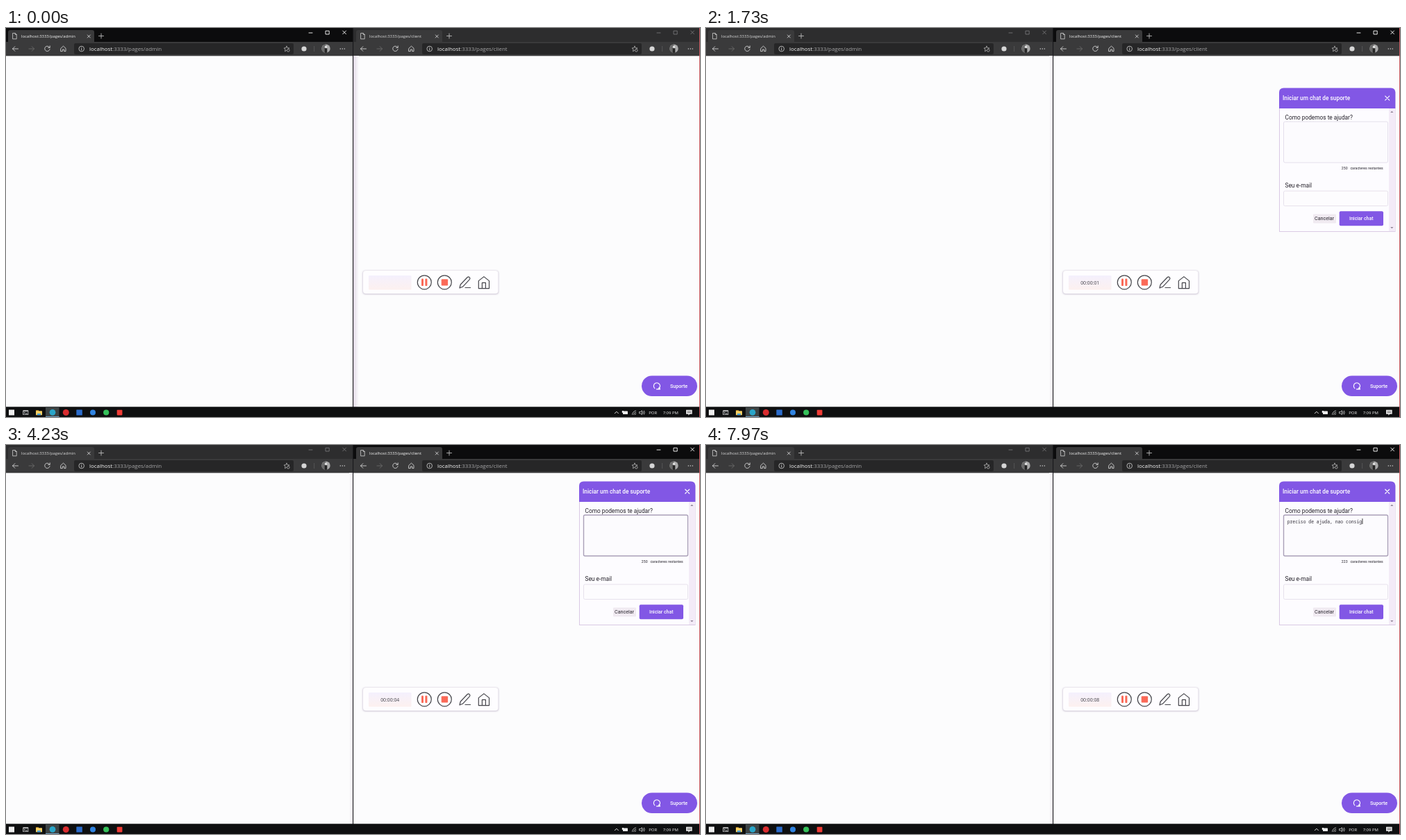
Animation, 999 px wide and 561 px high, one loop 8000 ms. Source, as an HTML page:

```html
<!DOCTYPE html>
<html lang="pt">
<head>
<meta charset="utf-8">
<title>Chat de suporte</title>
<style>
  html, body { margin: 0; width: 100%; height: 100%; overflow: hidden; background: #fcfcfd; }
  svg { display: block; width: 999px; height: 561px; }
  .ui { font-family: "Open Sans", "Noto Sans", sans-serif; }
  .rb { font-family: Roboto, Arial, sans-serif; }
  .mono { font-family: "Noto Sans Mono", "DejaVu Sans Mono", monospace; white-space: pre; }
  .line { fill: none; stroke-linecap: round; stroke-linejoin: round; }
</style>
</head>
<body>
<svg id="stage" viewBox="0 0 999 561" xmlns="http://www.w3.org/2000/svg"></svg>
<script>
const LOOP = 8000;
const PURPLE = [130, 87, 229], HOVER = [148, 103, 239];
const MESSAGE = 'preciso de ajuda, nao consig';
const KEY_START = 4580, KEY_STEP = 125, CHAR_W = 3.84;
const SWITCH_AT = 1500, OPEN_AT = 1600, FOCUS_AT = 2450, BLINK = 530;

const rect = (x, y, w, h, fill, rx = 0, extra = '') =>
  `<rect x="${x}" y="${y}" width="${w}" height="${h}" rx="${rx}" fill="${fill}" ${extra}/>`;
const dot = (x, y, r, fill, extra = '') => `<circle cx="${x}" cy="${y}" r="${r}" fill="${fill}" ${extra}/>`;
const line = (d, color, w = 0.9, extra = '') =>
  `<path class="line" d="${d}" stroke="${color}" stroke-width="${w}" ${extra}/>`;
const text = (x, y, size, fill, str, cls = 'ui', extra = '') =>
  `<text x="${x}" y="${y}" font-size="${size}" fill="${fill}" class="${cls}" ${extra}>${str}</text>`;

function browser(id, x, page) {
  const ink = '#d2d2d2';
  return `<g transform="translate(${x} 0)">
    ${rect(x ? -1 : 0, 0, 500, 21, '#0c0c0d', 0, `id="${id}Bar"`)}
    <path d="M3 21V6Q3 3 6 3H124Q127 3 127 6V21Z" fill="#3a3a3b"/>
    ${rect(x ? -1 : 0, 20, 500, 20.3, '#3a3a3b')}
    ${line('M10 7.5h3.2l2 2v6.3h-5.2zM13.2 7.5v2h2', ink, 0.8)}
    <g id="${id}Tab">${text(22, 14, 5.9, '#f2f2f2', 'localhost:3333/pages/' + page)}</g>
    ${line('M117.3 10l4 4m0-4l-4 4', ink)}
    ${line('M133.5 11.5h7m-3.5-3.5v7', '#bdbdbd')}
    <g id="${id}Ctl" stroke="#fff">
      ${line('M436 7h5M460.4 4.2h4.8v4.8h-4.8zM484.7 4l4.8 4.8m0-4.8l-4.8 4.8', 'inherit', 0.9)}
    </g>
    ${line('M17.5 30h-8m3.3-3.3l-3.3 3.3l3.3 3.3', ink)}
    ${line('M33 30h7.5m-3.2-3.3l3.2 3.3l-3.2 3.3', '#6a6a6a')}
    ${line('M62.7 28a3.7 3.7 0 1 0 .4 2.6M63.2 25.8v2.6h-2.6', ink)}
    ${line('M79 29.3l3.5-3.2l3.5 3.2v4.3h-2.3v-2.6h-2.4v2.6h-2.3z', ink)}
    ${rect(98, 22, 316, 16, '#262627', 2)}
    ${dot(108.7, 30, 3.8, 'none', `stroke="${ink}" stroke-width=".8"`)}
    ${line('M108.7 29.6v2.3M108.7 28v.1', ink, 0.9)}
    ${text(120, 33, 7.9, '#f4f4f4', `localhost<tspan fill="#a5a5a6">:3333/pages/${page}</tspan>`)}
    ${line('M404 26.2l1.1 2.5l2.9.3l-2 1.6M404 26.2l-1.1 2.5l-2.9.3l2.1 1.9l-.6 2.8l2-1.2', '#b8b8b8', 0.8)}
    ${dot(406.3, 32.3, 1.8, '#262627', 'stroke="#b8b8b8" stroke-width=".8"')}
    ${dot(429, 30, 3.6, '#d6d6d6')}
    ${rect(443.3, 26, 0.8, 8, '#5c5c5c')}
    ${dot(460.5, 29.7, 6.2, '#aaa')}
    <path d="M460.5 23.5a6.2 6.2 0 0 0-1 12.3z" fill="#6b6b6b"/>
    <path d="M458.7 35.5v-6.2h3.6v6.2q-1.8.8-3.6 0z" fill="#252525"/>${dot(460.5, 27.3, 1.7, '#e2e2e2')}
    ${[481.3, 484.3, 487.3].map(cx => dot(cx, 30, 0.75, ink)).join('')}
  </g>`;
}

function recorder() {
  const ink = '#45454b', red = '#fa6a58';
  return `${rect(513.5, 350, 195.5, 34, '#b9aec4', 4, 'filter="url(#soft)" opacity=".75"')}
    ${rect(514, 350, 194.5, 33, '#fefdff', 4)}
    ${rect(522, 357, 61.5, 20.5, 'url(#clockBg)', 1)}
    ${text(552.7, 369.7, 6.8, '#3c3c44', '', 'ui', 'id="clock" text-anchor="middle"')}
    ${[602.3, 631.3].map(x => dot(x, 366.8, 10, '#fff', `stroke="${ink}" stroke-width="1.2"`)).join('')}
    ${rect(598, 361.5, 3, 10.5, red, 1)}${rect(603.4, 361.5, 3, 10.5, red, 1)}
    ${rect(626.7, 362.2, 9.4, 9.4, red, 1)}
    ${line('M653 375l1.2-5l10-10.5q1.6-1.3 3 .1q1.4 1.4 .1 3l-10 10.7zM661 374.5h7.5', ink, 1.2)}
    ${line('M680.3 364.6l7.6-6l7.6 6v11h-15.2zM685.4 375.4v-8h5v8', ink, 1.2)}`;
}

function chatPanel() {
  const main = `rgb(${PURPLE})`;
  return `<g id="panel" display="none">
    ${rect(825.5, 58, 166.5, 201.5, '#fdfcff', 0, 'stroke="#d9c9e4" stroke-width="1"')}
    <path d="M825 82V59Q825 52.5 831.5 52.5H986Q992.3 52.5 992.3 59V82Z" fill="${main}"/>
    ${text(830, 70, 8.32, '#fff', 'Iniciar um chat de suporte', 'rb', 'font-weight="500"')}
    ${line('M977.7 64l6 6m0-6l-6 6', '#fff', 1.1)}
    ${rect(983, 82, 9, 177, '#f3ebf7')}
    <path d="M985.2 88l2.1-2.3l2.1 2.3zM985.2 253l2.1 2.3l2.1-2.3z" fill="#8d8295"/>
    ${text(833.5, 98.2, 8.32, '#25222b', 'Como podemos te ajudar?', 'rb')}
    ${rect(831.5, 101, 150, 59, '#fcfbfe', 2, 'id="area" stroke="#e4dfec" stroke-width="1"')}
    ${text(836.7, 112.5, 6.4, '#33303a', '', 'mono', 'id="typed"')}
    ${rect(837, 106, 0.8, 8, '#111', 0, 'id="caret"')}
    ${text(914.8, 170.3, 5.2, '#28252e', '250', 'rb', 'id="left"')}
    ${text(927.4, 170.3, 5.2, '#28252e', 'caracteres restantes', 'rb')}
    ${text(833.5, 195.8, 8.32, '#25222b', 'Seu e-mail', 'rb')}
    ${rect(831.5, 201, 150, 21.5, '#fdfcfe', 2, 'stroke="#e7e1ec" stroke-width="1"')}
    ${rect(874, 234.5, 33, 13, '#f0eaf1', 1)}
    ${text(890, 243.3, 7.1, '#25222b', 'Cancelar', 'rb', 'text-anchor="middle"')}
    ${rect(911.7, 230.3, 63.3, 21, main, 2)}
    ${text(943.3, 243.3, 6.94, '#fff', 'Iniciar chat', 'rb', 'text-anchor="middle" font-weight="500"')}
  </g>`;
}

function taskbar() {
  const w = '#ededed';
  return `${rect(0, 546.3, 999, 15, '#0e0f10')}
    ${rect(4, 550.5, 8, 8, w)}
    ${rect(24.3, 551.3, 8, 6.8, '#d5d5d5', 0.6)}${rect(25, 552.8, 6.6, 4.6, '#26282a')}
    ${line('M26 554l1.2 1l-1.2 1M28.4 556.3h2', '#fff', 0.6)}
    ${rect(43, 551.3, 4, 3, '#e5a82e')}${rect(43, 552.3, 9, 6, '#f5cf63', 0.5)}${rect(45, 556, 5, 2.3, '#4a9fd8')}
    ${rect(57, 546.3, 19.5, 15, '#3c4243')}${dot(67, 554.3, 4.4, '#2aa5c8')}
    ${rect(57, 560.2, 19.5, 0.8, '#7db4dc')}
    ${dot(86.3, 554.5, 4.5, '#d92c2f')}
    ${rect(101.3, 550.5, 8.5, 8, '#2c6ccb', 0.5)}
    ${dot(125, 554.5, 4, '#3083e0')}
    ${dot(144.2, 554.5, 4.1, '#35c15a')}
    ${rect(159.7, 550.7, 7.7, 7.7, '#ef3b35', 0.8)}
    ${line('M876.3 555.8l2.6-2.6l2.6 2.6', w, 0.9)}
    ${rect(888, 552.6, 7, 4.4, w, 0.6)}${rect(886.8, 552, 2.2, 3, w)}
    ${line('M901.5 557.5a5.5 5.5 0 0 1 5.2-5.5M903.5 557.5a3.3 3.3 0 0 1 3.2-3.2M905.5 557.5a1.3 1.3 0 0 1 1.2-1.2', '#cfcfcf', 0.8)}
    ${line('M912 553.5h1.4l2-1.8v6l-2-1.8h-1.4zM917 553.2q1 1.5 0 3M918.5 552q1.8 2.7 0 5.2', w, 0.7)}
    ${text(925.2, 557, 6, w, 'POR')}${text(945.7, 557, 5.9, w, '7:09 PM')}
    <path d="M979 550.8h8.6v6h-3.3l-2 2v-2h-3.3z" fill="${w}"/>
    ${line('M980.8 552.8h5M980.8 554.6h5', '#222', 0.6)}`;
}

const grad = (id, dir, a, b) =>
  `<linearGradient id="${id}" ${dir}><stop stop-color="${a}"/><stop offset="1" stop-color="${b}"/></linearGradient>`;

document.getElementById('stage').innerHTML = `
  <defs>
    ${grad('clockBg', 'x1="0" y1="0" x2="0" y2="1"', '#f4f0fd', '#fdf1ef')}
    ${grad('shadeR', '', '#e2d9e6', '#fcfcfd')}
    ${grad('shadeL', '', '#fcfcfd', '#efeaf1')}
    <filter id="soft" x="-5%" y="-20%" width="110%" height="140%"><feGaussianBlur stdDeviation="1.2"/></filter>
  </defs>
  ${rect(0, 0, 999, 561, '#fcfcfd')}
  ${browser('admin', 0, 'admin')}
  ${browser('client', 501, 'client')}
  ${rect(500, 40, 8, 507, 'url(#shadeR)', 0, 'id="shadeRight"')}
  ${rect(494, 40, 5, 507, 'url(#shadeL)', 0, 'id="shadeLeft"')}
  ${rect(499, 0, 1.1, 547, '#19191b')}
  ${recorder()}
  ${rect(915, 501.5, 80, 29.5, '', 14.75, 'id="pill"')}
  ${line('M933.8 519.7a4.6 4.6 0 1 1 2.6 1.2M940 518.2l1.6 2.7l-5.2 0', '#fff', 1.1)}
  ${text(956, 518.8, 7.1, '#fff', 'Suporte', 'rb', 'font-weight="500"')}
  ${chatPanel()}
  ${taskbar()}
  ${rect(998, 0, 1, 561, '#c95a60')}`;

const el = {};
document.querySelectorAll('[id]').forEach(n => el[n.id] = n);

const clamp01 = v => Math.max(0, Math.min(1, v));
const show = (node, on) => node.setAttribute('display', on ? 'inline' : 'none');

function setActive(id, on) {
  el[id + 'Bar'].setAttribute('fill', on ? '#0c0c0d' : '#2d2d2e');
  el[id + 'Tab'].setAttribute('opacity', on ? 1 : 0.85);
  el[id + 'Ctl'].setAttribute('stroke', on ? '#fff' : '#747476');
}

function draw(t) {
  const clientOn = t >= SWITCH_AT;
  setActive('admin', !clientOn);
  setActive('client', clientOn);
  show(el.shadeRight, !clientOn);
  show(el.shadeLeft, clientOn);

  const secs = Math.floor((t + 100) / 1000);
  el.clock.textContent = t < 30 ? '' : '00:00:0' + secs;

  const hover = clamp01((t - 800) / 150) - clamp01((t - 1570) / 150);
  el.pill.setAttribute('fill', `rgb(${PURPLE.map((c, i) => Math.round(c + (HOVER[i] - c) * hover))})`);

  const rest = 1 - clamp01((t - OPEN_AT) / 400);
  show(el.panel, t >= OPEN_AT);
  el.panel.setAttribute('transform', `translate(0 ${(112 * rest ** 3).toFixed(2)})`);

  const focused = t >= FOCUS_AT;
  el.area.setAttribute('stroke', focused ? '#aaa0b8' : '#e4dfec');
  el.area.setAttribute('stroke-width', focused ? 1.4 : 1);

  const typed = Math.max(0, Math.min(MESSAGE.length, Math.floor((t - KEY_START) / KEY_STEP) + 1));
  el.typed.textContent = MESSAGE.slice(0, typed);
  el.left.textContent = 250 - Math.max(0, typed - 1); // counter trails by one key
  el.caret.setAttribute('x', 837 + typed * CHAR_W);
  show(el.caret, focused && (typed > 0 || (t - FOCUS_AT) % (2 * BLINK) < BLINK));
}

const start = performance.now();
function tick() {
  draw((performance.now() - start) % LOOP);
  requestAnimationFrame(tick);
}
tick();
</script>
</body>
</html>
```
